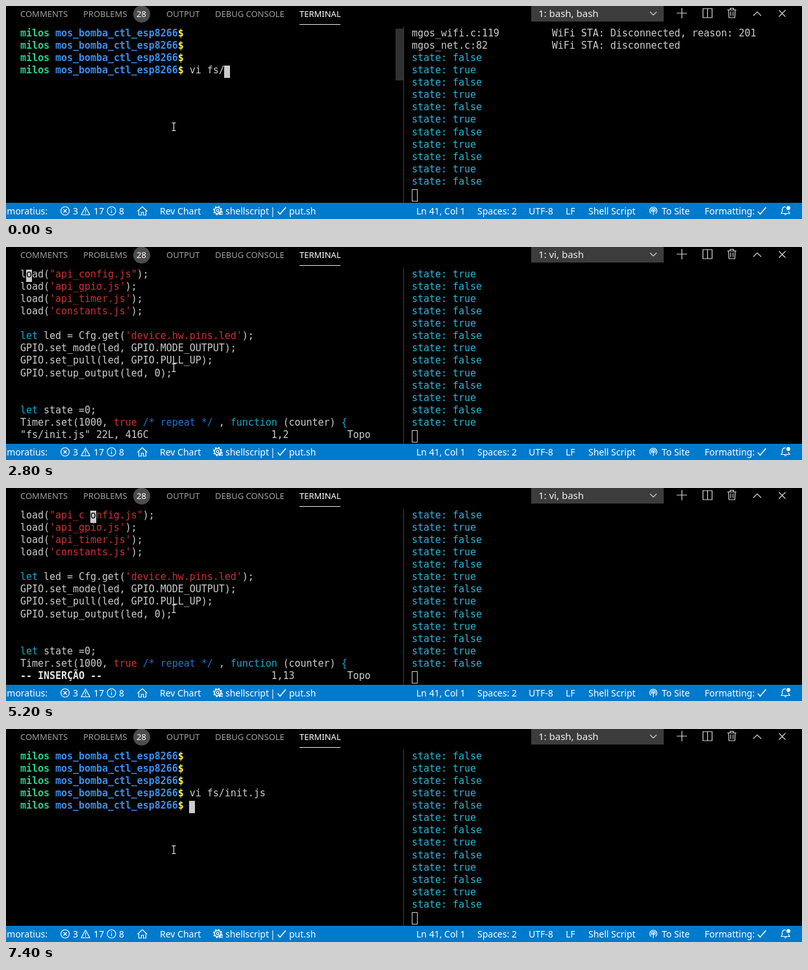
Recreate the animation shown at these times as an HTML page. Size 1226x329 px, loop 8 s.

```html
<!DOCTYPE html>
<html lang="en">
<head>
<meta charset="utf-8">
<title>Terminal session</title>
<style>
html, body { margin: 0; width: 100%; height: 100%; overflow: hidden; background: #000; }
#stage { position: relative; width: 1226px; height: 329px; overflow: hidden; background: #000; }
#stage > * { position: absolute; }
.ui { white-space: pre; line-height: 20px; color: #fff; font-family: "Noto Sans", "Open Sans", sans-serif; }
.tab { top: 2px; font-size: 13px; color: #a0a0a0; }
.stat { top: 307px; font-size: 14px; }
#title { left: 820px; top: 1px; font-size: 15px; color: #f0f0f0; }
.term { top: 33px; margin: 0; color: #ccc; font: 15px/19.07px "DejaVu Sans Mono", monospace; letter-spacing: -.04px; }
.term b { color: #e5e5e5; }
.term .g { color: #23d18b; }
.term .u { color: #3b8eea; }
.term .y { color: #f5f543; }
.term .r { color: #cd3131; }
.term .c { color: #2472c8; }
.term .k { color: #11a8cd; }
#right .k { color: #29b8db; }
#cursor { width: 9px; height: 19px; background: #ccc; color: #000; line-height: 15px; white-space: pre; }
#bar { left: 0; top: 304px; width: 1226px; height: 25px; background: #007acc; }
svg { left: 0; top: 0; }
</style>
</head>
<body>
<div id="stage">
  <div style="left:809px;top:0;width:204px;height:24px;background:#3c3c3c"></div>
  <div style="left:612px;top:32px;width:1px;height:272px;background:#404040"></div>
  <div id="scroll" style="left:600px;top:35px;width:12px;height:80px;background:#303030"></div>
  <div id="bar"></div>
  <div class="ui" id="title"></div>
  <pre class="term" id="left" style="left:22px"></pre>
  <pre class="term" id="right" style="left:625px"></pre>
  <div class="term" id="cursor"></div>
  <svg width="1226" height="329" fill="none" stroke="#d4d4d4" stroke-width="1.2">
    <circle cx="209" cy="12.500" r="13" fill="#4d4d4d" stroke="none"/>
    <path d="M452 28.500h63" stroke="#e7e7e7" stroke-width="1"/>
    <path d="M992 9l5 5 5-5M1041 3v16M1033 11h16M1073.500 4h14v14h-14zM1080.500 4v14"/>
    <path d="M1111 6h14M1115.500 6v-2.500h5v2.500M1112.800 6l.7 12h9l.7-12M1116.200 8.500v7M1119.800 8.500v7M1151 15l6-6 6 6M1190.500 6.500l10 10M1200.500 6.500l-10 10"/>
    <rect x="625.500" y="283.500" width="8" height="18" stroke="#ccc" stroke-width="1"/>
    <path d="M255.500 180.500h6M258.500 180.500v12M255.500 192.500h6" stroke="#fff" stroke-width="1"/>
    <g stroke="#fff">
      <circle cx="91" cy="316.500" r="6.500"/>
      <path d="M88.500 314l5 5M93.500 314l-5 5M122.500 310.500l6.500 12h-13zM122.500 314.500v4M122.500 319.500v1.500"/>
      <circle cx="162.500" cy="316.500" r="6.500"/>
      <path d="M162.500 315.500v4.500M162.500 312.500v1.500M202.500 317l7.500-7 7.500 7M204.500 315.500v7.500h4v-4.500h3v4.500h4v-7.500"/>
      <circle cx="326" cy="316" r="4.800" stroke-width="1.500"/>
      <circle cx="326" cy="316" r="6.300" stroke-width="1.500" stroke-dasharray="2.470"/>
      <circle cx="326" cy="316" r="1.800"/>
      <path d="M327 318.500h7M328 321.500h6" stroke-width="1.500"/>
      <path d="M418.500 317.500l3.500 4 9-10.500M1158 317.500l3.500 4 9-10.500" stroke-width="1.500"/>
      <path d="M993.500 320.500a5.500 5.500 0 1 1 7 0M995 317.800a2.800 2.800 0 1 1 4 0M997 317v6"/>
      <circle cx="997" cy="316" r="1.500" fill="#fff" stroke="none"/>
      <path d="M1201 310.500c-4-1-5.500 2-5.500 5v2.500l-1.500 2.500h13l-1.500-2.500v-1.500M1199 321.500q1.500 2 3 0"/>
      <circle cx="1205" cy="312" r="3" fill="#fff" stroke="none"/>
    </g>
  </svg>
</div>
<script>
const $ = id => document.getElementById(id);
const stage = $('stage');

function label(cls, x, text, style = '') {
  stage.insertAdjacentHTML('beforeend', `<div class="ui ${cls}" style="left:${x}px;${style}">${text}</div>`);
}
[[22, 'COMMENTS'], [119, 'PROBLEMS'], [247, 'OUTPUT'], [322, 'DEBUG CONSOLE']].forEach(a => label('tab', ...a));
label('tab', 452, 'TERMINAL', 'color:#fff');
label('tab', 201, '28', 'color:#fff');
label('stat', 0, 'elmoratius:', 'left:auto;right:1162px');
[[103, '3'], [135, '17'], [174, '8'], [237, 'Rev Chart'], [338, 'shellscript'], [407, '|'], [436, 'put.sh'],
 [632, 'Ln 41, Col 1'], [726, 'Spaces: 2'], [805, 'UTF-8'], [862, 'LF'], [897, 'Shell Script'],
 [1010, 'To Site'], [1076, 'Formatting:']].forEach(a => label('stat', ...a));

const prompt = '<b class="g">milos</b> <b class="u">mos_bomba_ctl_esp8266</b><b class="y">$</b> ';
const promptLen = 29;
const cellW = 8.98, cellH = 19.07;

const source = first => `${first}
load('api_gpio.js');
load('api_timer.js');
load('constants.js');

let led = Cfg.get('device.hw.pins.led');
GPIO.set_mode(led, GPIO.MODE_OUTPUT);
GPIO.set_pull(led, GPIO.PULL_UP);
GPIO.setup_output(led, 0);


let state =0;
Timer.set(1000, true /* repeat */ , function (counter) {
`;
const paint = code => code.replace(/('.*?'|".*?"|\btrue\b)|(\/\*.*?\*\/)|(\blet\b|function|{)/g,
  (s, red, blue) => `<span class="${red ? 'r' : blue ? 'c' : 'k'}">${s}</span>`);

// Shell view: three empty prompts, then the typed command
const shell = cmd => ({
  html: (prompt + '\n').repeat(3) + prompt + cmd, cur: [3, promptLen + cmd.length, ''], title: 'bash'
});
const afterVi = (last, col, title) => ({
  html: shell('vi fs/init.js\n').html + last, cur: [4, col, ''], title
});

// Editor view: file text, bottom line, cursor as [row, column, character]
const plain = 'load("api_config.js");', edited = 'load("api_c onfig.js");';
const editor = (first, bottom, cur) => ({ html: paint(source(first)) + bottom, cur, title: 'vi' });
const ruler = col => `1,${col}`.padEnd(13) + 'Topo';
const browse = col => editor(plain, '"fs/init.js" 22L, 416C'.padEnd(43) + ruler(col), [0, col - 1, plain[col - 1]]);
const command = s => editor(edited, s, [13, s.length, '']);

const steps = [
  [0, shell('vi fs/')], [200, shell('vi fs/i')], [400, shell('vi fs/in')],
  [600, shell('vi fs/ini')], [1000, shell('vi fs/init.js ')],
  [1600, browse(1)], [2800, browse(2)], [3200, browse(3)], [3400, browse(9)], [3600, browse(12)],
  [4600, editor(edited, '<b>-- INSERÇÃO --</b>'.padEnd(50) + ruler(13), [0, 12, 'o'])],
  [5600, editor(edited, 'Digite  :q&lt;Enter>  para sair do Vim')],
  [5800, command(':')], [6200, command(':wq')],
  [6400, editor(edited, '"fs/init.js"')],
  [7000, afterVi('', 0, 'vi')], [7200, afterVi(prompt, promptLen, 'bash')]
];

// Device log, scrolled up one line at each tick
const ticks = [200, 1400, 2400, 3400, 4400, 5200, 6400, 7400];
const log = [
  'mgos_wifi.c:119'.padEnd(24) + 'WiFi STA: Disconnected, reason: 201',
  'mgos_net.c:82'.padEnd(24) + 'WiFi STA: disconnected'
];
for (let i = 0; i < 20; i++) log.push(`<span class="k">state: ${i % 2 === 1}</span>`);

let shownStep, shownTop;
function frame() {
  const t = performance.now() % 8000;
  const step = steps.filter(s => s[0] <= t).pop()[1];
  const top = ticks.filter(x => x <= t).length;
  if (step !== shownStep) {
    const { html, cur, title } = shownStep = step;
    $('left').innerHTML = html;
    $('title').textContent = `1: ${title}, bash`;
    $('scroll').hidden = t >= 1600;
    $('cursor').hidden = !cur;
    if (cur) {
      $('cursor').style.left = 22 + cellW * cur[1] + 'px';
      $('cursor').style.top = 35 + cellH * cur[0] + 'px';
      $('cursor').textContent = cur[2];
    }
  }
  if (top !== shownTop) {
    shownTop = top;
    $('right').innerHTML = log.slice(top, top + 13).join('\n');
  }
  requestAnimationFrame(frame);
}
frame();
</script>
</body>
</html>
```
